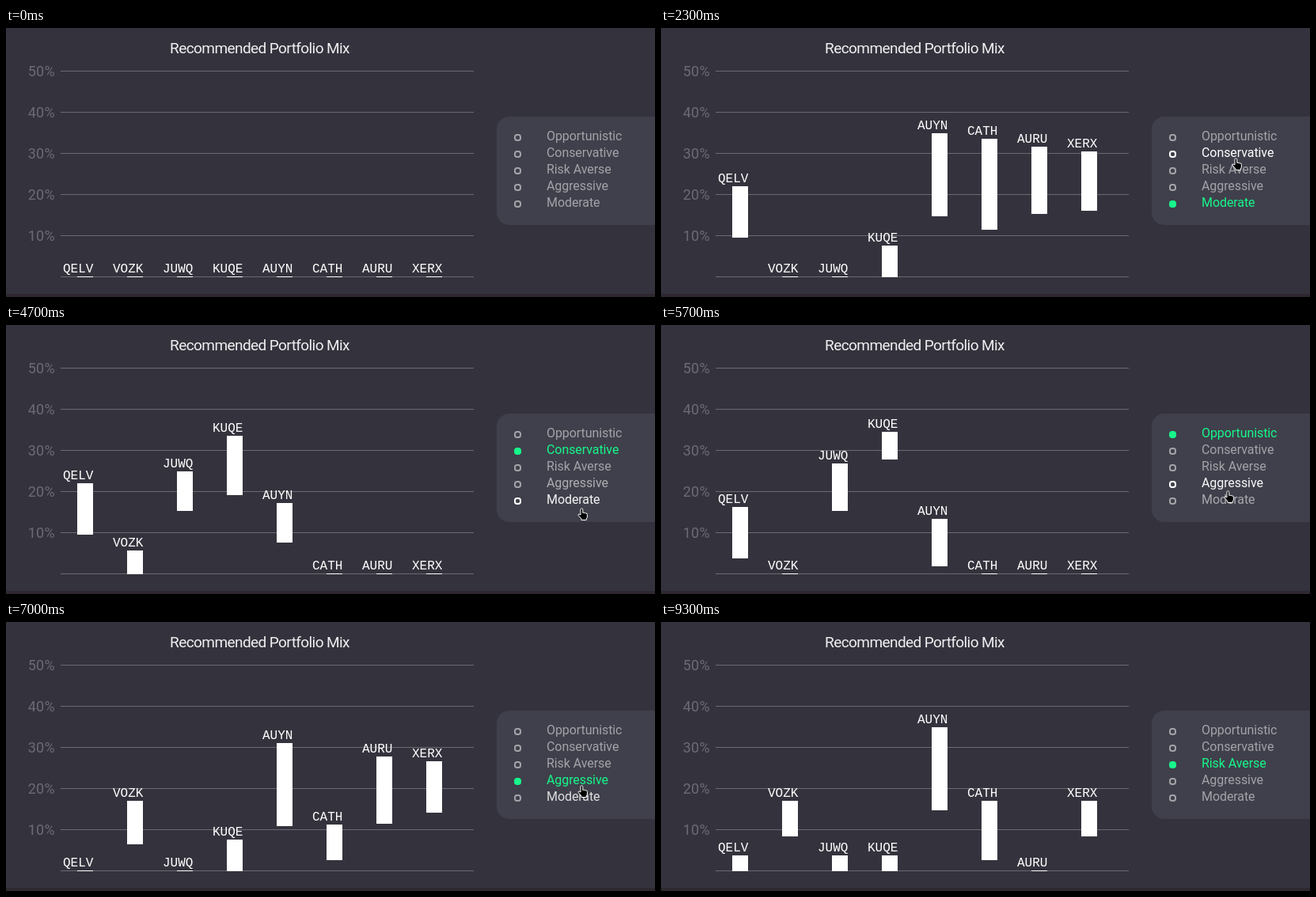
Animation, 820 px wide and 340 px high, one loop 10 s. Source, as an HTML page:

```html
<!DOCTYPE html>
<html lang="en">
<head>
<meta charset="utf-8">
<title>Recommended Portfolio Mix</title>
<style>
  html, body { margin: 0; width: 100%; height: 100%; overflow: hidden; background: #34333d; }
  svg { display: block; }
  .title { font: 400 19px Roboto, sans-serif; letter-spacing: -.58px; fill: #f0f0f2; text-anchor: middle; }
  .axis { font: 400 18px Roboto, sans-serif; letter-spacing: .3px; fill: #6c6b74; text-anchor: end; }
  .ticker { font: 400 16px "Liberation Mono", monospace; fill: #fff; }
  .option { font: 400 16px Roboto, sans-serif; letter-spacing: -.08px; }
</style>
</head>
<body>
<svg id="stage" width="820" height="340" viewBox="0 0 820 340">
  <rect width="820" height="340" fill="#34333d"/>
  <rect y="336" width="820" height="4" fill="#2f2831"/>
  <path d="M820 112H636a16 16 0 0 0-16 16v105a16 16 0 0 0 16 16h184z" fill="#3f404b"/>
  <text class="title" x="320.5" y="32">Recommended Portfolio Mix</text>
</svg>
<script>
const LOOP = 10000, STEP = 100, BAR_TIME = 700, FADE_TIME = 200, PRESS_TIME = 100;
const ROW_TOP = 128.5, ROW_HEIGHT = 21;
const GREY = [163, 163, 168], WHITE = [255, 255, 255], GREEN = [23, 247, 139];

const tickers = ['QELV', 'VOZK', 'JUWQ', 'KUQE', 'AUYN', 'CATH', 'AURU', 'XERX'];
const FLAT = [314, 1];

// Bars as [top, height]; a ticker left out stays flat
const options = [
  { name: 'Opportunistic',
    bars: { QELV: [230, 65], JUWQ: [175, 60], KUQE: [135, 35], AUYN: [245, 60] } },
  { name: 'Conservative',
    bars: { QELV: [200, 65], VOZK: [285, 30], JUWQ: [185, 50], KUQE: [140, 75], AUYN: [225, 50] } },
  { name: 'Risk Averse',
    bars: { QELV: [295, 20], VOZK: [226, 45], JUWQ: [295, 20], KUQE: [295, 20],
            AUYN: [133, 105], CATH: [226, 75], XERX: [226, 45] } },
  { name: 'Aggressive',
    bars: { VOZK: [226, 55], KUQE: [275, 40], AUYN: [153, 105], CATH: [256, 45],
            AURU: [170, 85], XERX: [176, 65] } },
  { name: 'Moderate',
    bars: { QELV: [200, 65], KUQE: [275, 40], AUYN: [133, 105], CATH: [140, 115],
            AURU: [150, 85], XERX: [156, 75] } },
];

const clicks = [
  { time: 1262, option: 4 }, { time: 3362, option: 1 }, { time: 4865, option: 0 },
  { time: 6265, option: 3 }, { time: 8265, option: 2 },
];

// Pointer glides: [start, end, x, y]; it rests in between
const entry = [770, 137], SHOW = 500, HIDE = 9300;
const glides = [
  [SHOW, 1000, 731, 133], [1300, 2100, 721, 164], [3300, 3600, 723, 171], [4300, 4700, 722, 231],
  [4800, 5700, 711, 209], [6200, 6900, 722, 220], [6900, 7000, 722, 206], [7000, 7300, 722, 226],
  [7300, 7750, 726, 160], [7750, 8100, 728, 174], [8200, HIDE, 753, 180],
];

const stage = document.getElementById('stage');
function add(tag, attrs, text) {
  const el = document.createElementNS(stage.namespaceURI, tag);
  set(el, attrs);
  if (text) el.textContent = text;
  return stage.appendChild(el);
}
function set(el, attrs) {
  for (const key in attrs) el.setAttribute(key, attrs[key]);
}

const mix = (a, b, p) => a.map((v, i) => v + (b[i] - v) * p);
const rgb = c => `rgb(${c.map(Math.round)})`;
const clamp = x => Math.max(0, Math.min(1, x));

// Same curve as the CSS keyword "ease"
function ease(x) {
  const bezier = (a, b, s) => 3 * a * s * (1 - s) ** 2 + 3 * b * s * s * (1 - s) + s ** 3;
  let lo = 0, hi = 1;
  for (let i = 0; i < 20; i++) {
    const mid = (lo + hi) / 2;
    if (bezier(.25, .25, mid) < clamp(x)) lo = mid; else hi = mid;
  }
  return bezier(.1, 1, lo);
}

const lastClick = t => clicks.findLastIndex(c => c.time <= t);

function pointerAt(t) {
  let at = entry;
  for (const [start, end, ...to] of glides) {
    if (t > start) at = mix(at, to, clamp((t - start) / (end - start)));
  }
  return at;
}

function hoveredAt(t) {
  if (t < SHOW || t >= HIDE) return -1;
  return Math.floor((pointerAt(t)[1] - ROW_TOP) / ROW_HEIGHT);
}

function colorAt(row, t) {
  if (clicks[lastClick(t)]?.option === row) return GREEN;
  return hoveredAt(t) === row ? WHITE : GREY;
}

// Times at which an option takes a new colour
function colorChanges(row) {
  const changes = [{ time: 0, from: GREY, to: GREY }];
  for (let t = 0; t < LOOP; t += 5) {
    const from = changes.at(-1).to, to = colorAt(row, t);
    if (to !== from) changes.push({ time: t, from, to });
  }
  return changes;
}

// The index finger is short while the button is pressed
const hand = tip => `M4 9V${tip}a1.4 1.4 0 0 1 2.8 0V6.5q1-.8 2 .2 1-.7 2 .4 1.6-.4 1.6 1.2V11` +
  'q0 2-1.2 3v1.5H5V14L1.2 9.6Q.4 8.2 2 8z';

for (let i = 0; i < 6; i++) {
  const y = 54 + 52 * i;
  add('rect', { x: 69, y, width: 522, height: 1, fill: '#6b6a72' });
  if (i < 5) add('text', { class: 'axis', x: 62, y: y + 7 }, `${50 - 10 * i}%`);
}

const columns = tickers.map((name, i) => ({
  name,
  bar: add('rect', { x: 90 + 63 * i, width: 20, fill: '#fff' }),
  label: add('text', { class: 'ticker', x: 72 + 63 * i }, name),
}));

const rows = options.map(({ name }, i) => {
  const y = ROW_HEIGHT * i;
  return {
    ring: add('rect', { x: 643, y: 135 + y, width: 7, height: 7, rx: 2.8, 'stroke-width': 2, fill: rgb(GREEN) }),
    label: add('text', { class: 'option', x: 683, y: 141.5 + y }, name),
    changes: colorChanges(i),
  };
});

const pointer = add('path', { fill: '#000', stroke: '#fff', 'stroke-linejoin': 'round' });

function drawBars(t) {
  const i = lastClick(t);
  const barsOf = click => click ? options[click.option].bars : {};
  const from = barsOf(clicks[i - 1]), to = barsOf(clicks[i]);
  const p = i < 0 ? 1 : ease((t - clicks[i].time) / BAR_TIME);
  for (const { name, bar, label } of columns) {
    const [y, height] = mix(from[name] || FLAT, to[name] || FLAT, p).map(Math.round);
    set(bar, { y, height });
    set(label, { y: y - 5 });
  }
}

function drawRows(t) {
  for (const { ring, label, changes } of rows) {
    const { time, from, to } = changes.findLast(c => c.time <= t);
    const p = ease((t - time) / FADE_TIME);
    const fill = to === GREEN ? p : from === GREEN ? 1 - p : 0;
    set(label, { fill: rgb(mix(from, to, p)) });
    set(ring, { stroke: rgb(to), 'fill-opacity': fill });
  }
}

function drawPointer(t) {
  const pressed = clicks.some(c => t >= c.time && t < c.time + PRESS_TIME);
  const [x, y] = pointerAt(t).map(Math.round);
  set(pointer, {
    d: hand(pressed ? 5 : 2.2),
    transform: `translate(${x} ${y})`,
    visibility: t >= SHOW && t < HIDE ? 'visible' : 'hidden',
  });
}

const begin = performance.now();
function tick() {
  const elapsed = (performance.now() - begin) % LOOP;
  const t = Math.floor(elapsed / STEP) * STEP;
  drawBars(t);
  drawRows(t);
  drawPointer(t);
  requestAnimationFrame(tick);
}
tick();
</script>
</body>
</html>
```
